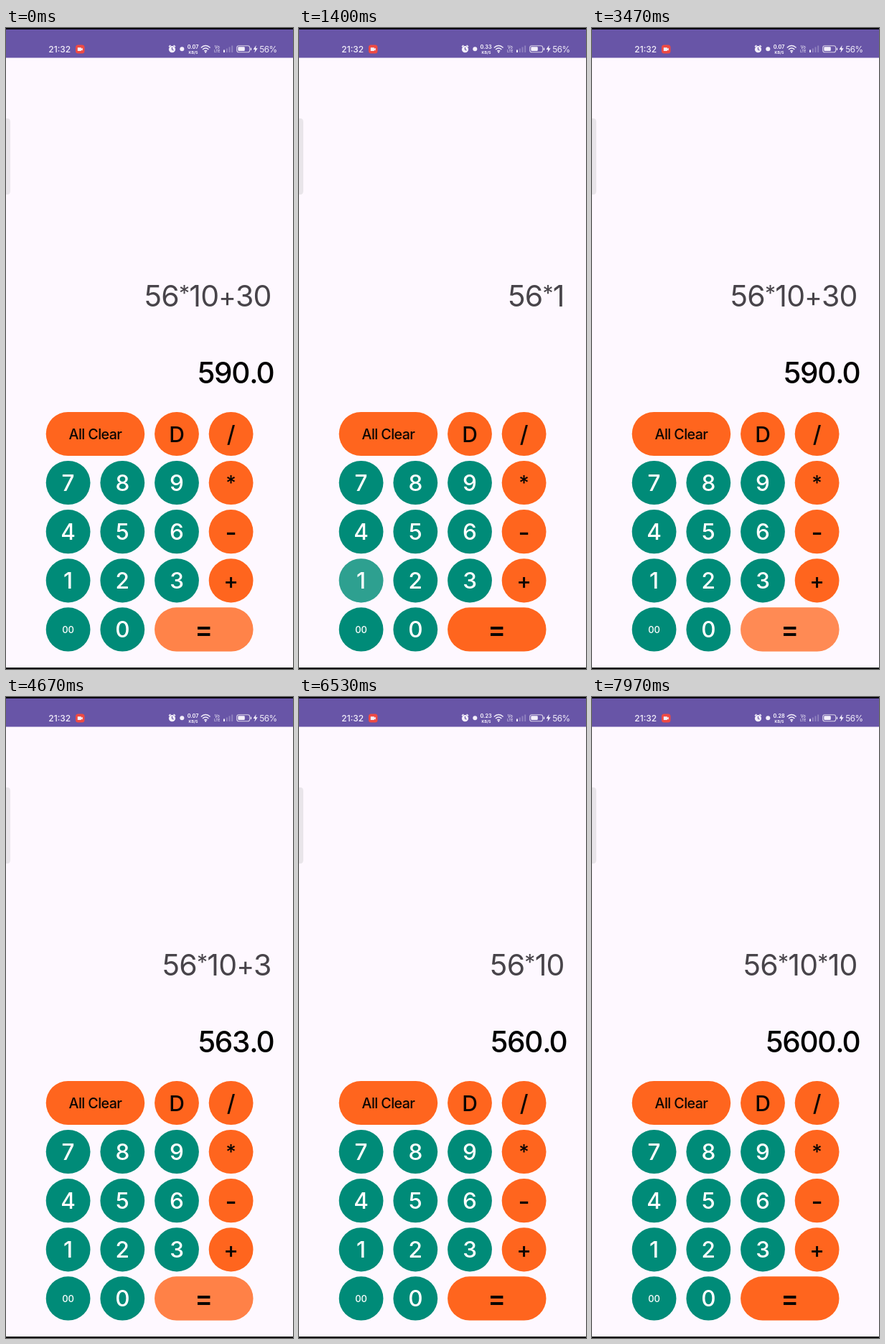
Write an HTML page that moves like this. It is 400 by 893 pixels and loops after 8 s.

```html
<!DOCTYPE html>
<html lang="en">
<head>
<meta charset="utf-8">
<title>Calculator</title>
<style>
  html, body { margin: 0; width: 100%; height: 100%; overflow: hidden; background: #fef8ff; }
  svg { display: block; width: 100%; height: 100%; font-family: Inter, "Liberation Sans", sans-serif; }
  #expr { font-size: 41px; letter-spacing: -.75px; fill: #48444a; text-anchor: end; }
  #expr .star { font-size: 30px; }
  #expr .plus { font-size: 37px; }
  #result { font-size: 40.5px; font-weight: 500; letter-spacing: -1.3px; text-anchor: end; }
  #result .dot { letter-spacing: -3px; }
  #keys text { text-anchor: middle; }
  #bar { fill: #f3effa; font-weight: 500; }
</style>
</head>
<body>
<svg viewBox="0 0 400 893" preserveAspectRatio="none">
  <rect width="400" height="893" fill="#fef8ff"/>
  <rect y="1" width="400" height="40.5" fill="#6855a7"/>
  <rect width="400" height="2" fill="#08060d"/>
  <rect y="891" width="400" height="2" fill="#050505"/>
  <path d="M0 126h2q4 0 4 5v96q0 5-4 5H0z" fill="#e9e5ea"/>

  <g id="bar">
    <text x="59.3" y="33.5" font-size="12">21:32</text>
    <rect x="97" y="23.5" width="12.5" height="12" rx="3.5" fill="#ee4a43"/>
    <path d="M99.8 27.2h5v1.5l2-1v3.8l-2-1v1.5h-5z"/>
    <circle cx="231.5" cy="29.7" r="4.6"/>
    <path d="M227 26.2l2.4-2M236 26.2l-2.4-2" stroke="#f3effa" stroke-width="1.5"/>
    <path d="M231.5 27v3l2 1" fill="none" stroke="#6855a7" stroke-width="1.2"/>
    <circle cx="245.3" cy="29.3" r="3"/>
    <text id="speed" x="260.5" y="29.3" font-size="7.2" font-weight="700" text-anchor="middle"></text>
    <text x="261" y="35.5" font-size="5.3" font-weight="700" text-anchor="middle">KB/S</text>
    <path d="M271.8 27.5q6.4-6 12.8 0M274 30q4.2-3.8 8.4 0M276.2 32.3q2-1.6 4 0"
      fill="none" stroke="#f3effa" stroke-width="1.4"/>
    <circle cx="278.2" cy="33.7" r="1.1"/>
    <text x="294.3" y="28.8" font-size="5.5" text-anchor="middle">Vo</text>
    <text x="294.3" y="34" font-size="4.6" text-anchor="middle">LTE</text>
    <rect x="303" y="30.5" width="2" height="3.5"/>
    <path d="M306.8 28.5h2v5.5h-2zM310.5 26.5h2v7.5h-2zM314.2 24.5h2v9.5h-2z" opacity=".28"/>
    <rect x="321.7" y="24.7" width="18" height="9" rx="2.8" fill="none" stroke="#d9d2e8" stroke-width="1.1"/>
    <rect x="323.3" y="26.3" width="9.5" height="5.8" rx="1.3"/>
    <rect x="340.8" y="27.5" width="1.3" height="3.5" rx=".6"/>
    <path d="M348.6 24l-4 6h2.6l-.8 4.5 4.3-6.3h-2.7z"/>
    <text x="353.2" y="33.5" font-size="11.8" font-weight="400" letter-spacing="-.5">56%</text>
  </g>

  <text id="expr" x="369.7" y="388"></text>
  <text id="result" x="373.3" y="495"></text>
  <g id="keys"></g>
</svg>
<script>
const LOOP = 8000, INTRO = 30;
const $ = id => document.getElementById(id);
const clamp = v => Math.max(0, Math.min(1, v));

const COLS = [86.6, 162.3, 238, 313.6], ROWS = [565.5, 633.5, 701.7, 769.8, 837.9];
const ORANGE = '#ff651e', GREEN = '#008b78';
const glows = {};

// Text style of the keys that differ from plain digits: [size, baseline offset, weight]
const LOOK = {
  'All Clear': [19.7, 7.2, 500], D: [30, 11, 500], '/': [32, 11.5, 500], '*': [28, 10.5, 500],
  '-': [35, 13.5, 500], '+': [31, 11, 500], '=': [37, 13, 600], '00': [13, 4.7, 500]
};

function addKey(label, col, row, span = 1) {
  const left = COLS[col] - 30.9, right = COLS[col + span - 1] + 30.9;
  const digit = /^\d+$/.test(label);
  const [size, dy, weight] = LOOK[label] || [31.5, 11.3, 500];
  const box = `x="${left}" y="${ROWS[row] - 30.6}" width="${right - left}" height="61.2" rx="30.6"`;
  const spacing = label === 'All Clear' ? -.6 : 0;
  $('keys').insertAdjacentHTML('beforeend',
    `<rect ${box} fill="${digit ? GREEN : ORANGE}"/>
     <rect ${box} fill="#fff" opacity="0" data-key="${label}"/>
     <text x="${(left + right) / 2}" y="${ROWS[row] + dy}" font-size="${size}" font-weight="${weight}"
       letter-spacing="${spacing}" fill="${digit ? '#fff' : '#0b0603'}">${label}</text>`);
  glows[label] = $('keys').querySelector(`[data-key="${label}"]`);
}

addKey('All Clear', 0, 0, 2);
addKey('D', 2, 0);
addKey('/', 3, 0);
['789*', '456-', '123+'].forEach((line, r) => [...line].forEach((k, c) => addKey(k, c, r + 1)));
addKey('00', 0, 4);
addKey('0', 1, 4);
addKey('=', 2, 4, 2);

const PRESSES = [
  [200, '5'], [470, '6'], [850, '*'], [1150, '1'], [1450, '0'], [1750, '='],
  [2250, '+'], [2600, '3'], [2950, '0'], [3330, '='],
  [4000, 'D'], [4420, '='],
  [5000, 'D'], [5400, 'D'], [5950, '='],
  [6650, '*'], [6950, '1'], [7250, '0'], [7550, '=']
];
const SPEEDS = [[0, '0.07'], [INTRO, '0.33'], [1500, '0.14'], [2950, '0.07'], [5500, '0.23'], [7000, '0.28']];

const evaluate = expr => expr.split('+')
  .map(term => term.split('*').reduce((a, b) => a * b, 1))
  .reduce((a, b) => a + b, 0).toFixed(1);

function stateAt(t) {
  if (t < INTRO) return { expr: '56*10+30', result: '590.0', presses: [[-240, '=']] };
  let expr = '', result = '';
  for (const [at, key] of PRESSES) {
    if (at + 80 > t) break;
    if (key === '=') result = evaluate(expr);
    else expr = key === 'D' ? expr.slice(0, -1) : expr + key;
  }
  return { expr, result, presses: PRESSES };
}

function exprMarkup(expr) {
  let drop = 0;
  return [...expr].map(ch => {
    const star = ch === '*', y = star ? -8 : 0;
    const cls = star ? 'star' : ch === '+' ? 'plus' : '';
    const span = `<tspan class="${cls}" dy="${y - drop}">${ch}</tspan>`;
    drop = y;
    return span;
  }).join('');
}

function setMarkup(el, html) {
  if (el.shown !== html) el.innerHTML = el.shown = html;
}

function draw(t) {
  const { expr, result, presses } = stateAt(t);
  setMarkup($('expr'), exprMarkup(expr));
  setMarkup($('result'), result.replace('.', '<tspan class="dot">.</tspan>'));
  setMarkup($('speed'), SPEEDS.filter(s => s[0] <= t).pop()[1]);

  const glow = {};
  for (const [at, key] of presses) {
    const age = t - at;
    if (age >= 0 && age < 400) glow[key] = .24 * clamp(age / 80) * clamp((400 - age) / 200);
  }
  for (const key in glows) glows[key].setAttribute('opacity', glow[key] || 0);
}

const start = performance.now();
function tick(now) {
  draw(Math.max(0, now - start) % LOOP);
  requestAnimationFrame(tick);
}
draw(0);
requestAnimationFrame(tick);
</script>
</body>
</html>
```
